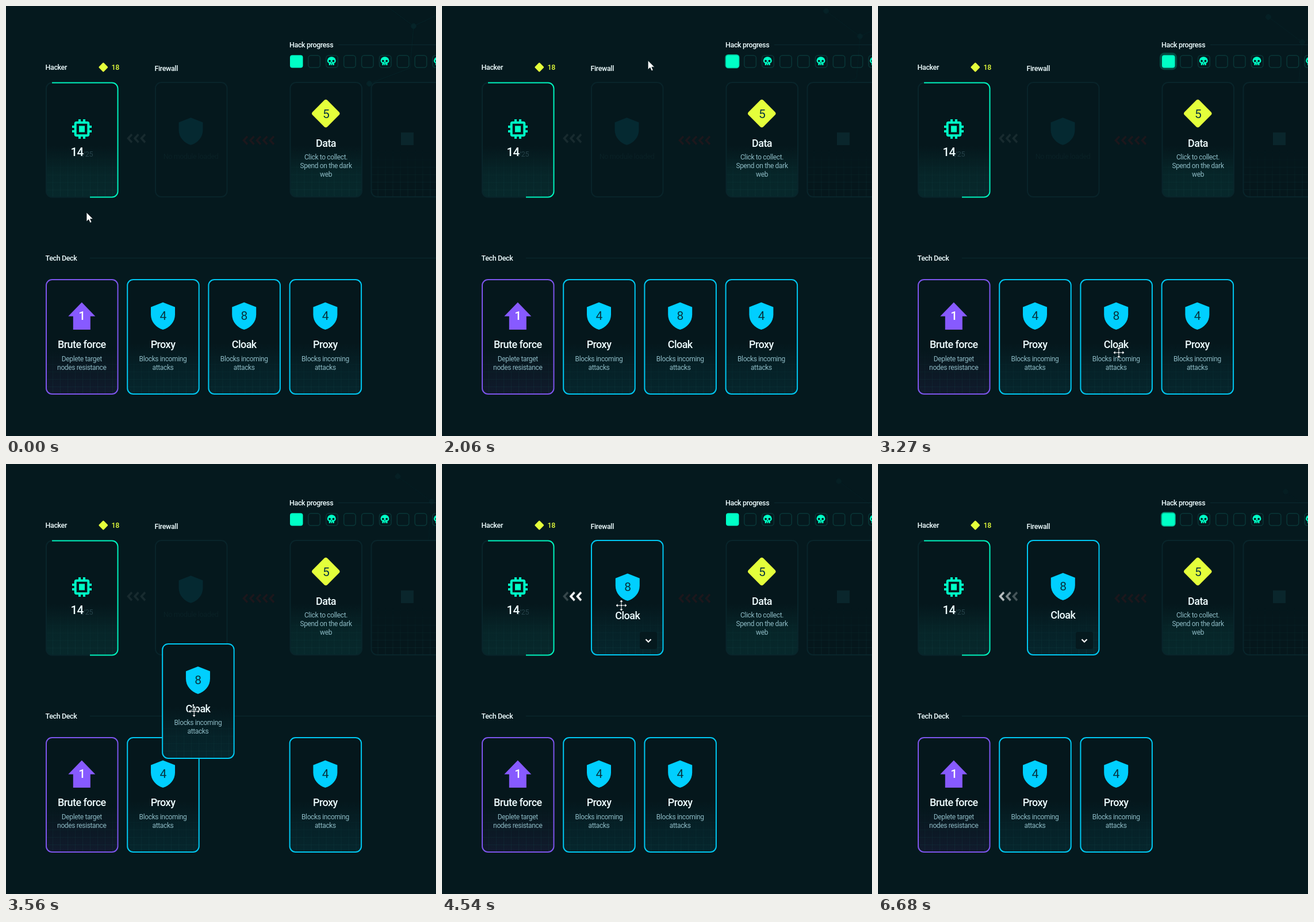
An HTML page for the animation above (6780 ms loop, 748 px wide and 748 px high).

```html
<!DOCTYPE html>
<html lang="en">
<head>
<meta charset="utf-8">
<title>Card table</title>
<style>
  html, body { margin: 0; width: 100%; height: 100%; overflow: hidden; background: #05191e; }
  svg { display: block; width: 100vw; height: 100vh; }
  text { font: 500 12.5px Roboto, sans-serif; letter-spacing: -.03em; fill: #effdff; }
  .mid { text-anchor: middle; }
  .title { font-size: 18px; }
  .desc { font-size: 12px; font-weight: 400; fill: #8dbac4; }
  .num { font-size: 21px; font-weight: 400; fill: #063440; }
  .line { stroke: #0b2a30; }
  .mint { fill: #00ffc6; }
  .lime { fill: #e4ff3b; }
  .chevrons path { fill: none; stroke: #fff; stroke-width: 3.6; }
  #threat path { stroke: #1c171c; }

  #ring { stroke: #00ffc6; animation: pulse 915ms linear -870ms infinite; }
  @keyframes pulse {
    0% { stroke-width: 0; stroke-opacity: .85; }
    70%, 100% { stroke-width: 11px; stroke-opacity: 0; }
  }
  #flow path { opacity: .08; animation: flow 915ms linear infinite; }
  #flow path:nth-child(3) { animation-delay: 4290ms; }
  #flow path:nth-child(2) { animation-delay: 4390ms; }
  #flow path:nth-child(1) { animation-delay: 4490ms; }
  @keyframes flow {
    0%, 4% { opacity: .08; }
    16%, 27% { opacity: 1; }
    70%, 100% { opacity: .08; }
  }
  #net { animation: drift 6780ms linear infinite; }
  @keyframes drift {
    from { transform: translate(0, 0); opacity: .85; }
    to { transform: translate(60px, 58px); opacity: .35; }
  }
</style>
</head>
<body>
<svg viewBox="0 0 748 748">
  <defs>
    <linearGradient id="teal" x2="0" y2="1">
      <stop offset=".55" stop-color="#0a4444" stop-opacity="0"/>
      <stop offset=".8" stop-color="#0a4444" stop-opacity=".32"/>
      <stop offset="1" stop-color="#0a4444" stop-opacity=".38"/>
    </linearGradient>
    <linearGradient id="blue" x2="0" y2="1">
      <stop offset=".55" stop-color="#07404a" stop-opacity="0"/>
      <stop offset=".8" stop-color="#07404a" stop-opacity=".26"/>
      <stop offset="1" stop-color="#07404a" stop-opacity=".36"/>
    </linearGradient>
    <linearGradient id="violet" x2="0" y2="1">
      <stop offset=".6" stop-color="#2b2250" stop-opacity="0"/>
      <stop offset="1" stop-color="#2b2250" stop-opacity=".32"/>
    </linearGradient>
    <linearGradient id="plain"><stop stop-opacity="0"/></linearGradient>
    <linearGradient id="fade" x2="0" y2="1">
      <stop offset=".58" stop-color="#fff" stop-opacity="0"/>
      <stop offset="1" stop-color="#fff"/>
    </linearGradient>
    <mask id="low"><rect width="127" height="201" fill="url(#fade)"/></mask>
    <pattern id="cells" width="13" height="13" patternUnits="userSpaceOnUse">
      <path d="M12.5 0V13M0 5.5H13" stroke="#14474b" stroke-opacity=".28" fill="none"/>
    </pattern>
    <path id="shield" d="M0-23.800 21-15.500V-2.500C21 10 12 20.500 0 23.800-12 20.500-21 10-21-2.500V-15.500Z" fill="#00cfff"/>
    <path id="up" d="M0-23.800 23.500.5H15V23.800H-15V.5H-23.500Z" fill="#875aff"/>
    <g id="skull">
      <path class="mint" d="M-7.5-1A7.5 6.8 0 0 1 7.5-1Q7.5 2 4.5 3.5V7H-4.5V3.5Q-7.5 2-7.5-1Z"/>
      <path d="M-1.5 4.8V7M1.5 4.8V7M0 1.5V3.4" stroke="#05191e" stroke-width="1.2"/>
      <circle cx="-3.2" cy="-.3" r="1.9" fill="#05191e"/><circle cx="3.2" cy="-.3" r="1.9" fill="#05191e"/>
    </g>
  </defs>

  <g id="net" fill="#08272c" stroke="#08262b">
    <path d="M650-9 709 35 703 108 632 135M709 35 780 2" fill="none"/>
    <circle cx="650" cy="-9" r="4.5"/><circle cx="709" cy="35" r="4.5"/><circle cx="632" cy="135" r="4.5"/>
  </g>

  <text x="493" y="71.5">Hack progress</text>
  <path class="line" d="M578 67.5H748M146 438.5H748"/>
  <g id="steps"></g>
  <text x="68.5" y="111">Hacker</text>
  <rect class="lime" x="-6" y="-6" width="12" height="12" rx="1.5" transform="translate(169.3 106.5)rotate(45)"/>
  <text class="lime" x="183.5" y="111">18</text>
  <text x="258.5" y="113">Firewall</text>
  <text x="68.5" y="442.5">Tech Deck</text>

  <g id="board"></g>

  <path d="M80 133.5H184.500A10 10 0 0 1 194.500 143.500V322.500A10 10 0 0 1 184.500 332.500H146" fill="none" stroke="#00f3bd" stroke-width="2"/>
  <g transform="translate(132 214)" stroke="#00ffc6" stroke-width="4">
    <rect x="-11.300" y="-11.300" width="22.600" height="22.600" rx="2" fill="none"/>
    <rect class="mint" x="-5" y="-5.500" width="10" height="11" stroke="none"/>
    <path d="M-4-17V-12M4-17V-12M-4 12V17M4 12V17M-17-4H-12M-17 4H-12M12-4H17M12 4H17"/>
  </g>
  <text x="112.500" y="260.500" style="font-size:20.500px">14</text>
  <text x="133" y="262" style="fill:#27434a;font-weight:400">/25</text>

  <use href="#shield" x="321.500" y="218" style="opacity:.09"/>
  <text class="mid" x="321.500" y="266" style="fill:#0a2126;font-weight:400">No module loaded</text>

  <rect class="lime" x="-18.200" y="-18.200" width="36.400" height="36.400" rx="4" transform="translate(556.300 187)rotate(45)"/>
  <text class="num mid" x="556.500" y="194.500">5</text>
  <text class="title mid" x="556.500" y="244.500">Data</text>
  <text class="desc mid" y="266.500"><tspan x="556.500">Click to collect.</tspan><tspan x="556.500" dy="15">Spend on the dark</tspan><tspan x="556.500" dy="15">web</tspan></text>

  <rect x="687" y="220" width="22" height="22" fill="#0a262c"/>

  <g id="flow" class="chevrons" transform="translate(210 222.500)"></g>
  <g id="threat" class="chevrons" transform="translate(411 226)"></g>

  <g id="deck"></g>

  <path id="arrow" d="M0 0V16L3.800 12.600 6.300 18.200 9 17 6.600 11.500H11.500Z" fill="#fff" stroke="#05191e" stroke-width=".8"/>
  <path id="move" d="M0-10 3.500-6H1V-1H6V-3.500L10 0 6 3.500V1H1V6H3.500L0 10-3.500 6H-1V1H-6V3.500L-10 0-6-3.500V-1H-1V-6H-3.500Z" fill="#fff" stroke="#05191e"/>
</svg>
<script>
const LOOP = 6780, GRAB = 3330, DROP = 4240, SETTLE = 4920;
const DECK_X = 69, DECK_Y = 475, PITCH = 141.2;
const $ = id => document.getElementById(id);
const place = (el, x, y) => el.setAttribute('transform', `translate(${x} ${y})`);
const show = (el, on) => el.style.display = on ? '' : 'none';

function base(tint, stroke) {
  const box = paint => `<rect x="1" y="1" width="124.500" height="199" rx="10" ${paint}/>`;
  return box('fill="#05171c"') + box(`fill="url(#${tint})"`)
    + box('fill="url(#cells)" mask="url(#low)"')
    + box(`fill="none" stroke="${stroke}" stroke-width="2"`);
}

const slot = (x, y, tint) =>
  `<g transform="translate(${x} ${y})">${base(tint, '#09252b')}</g>`;
$('board').innerHTML = slot(69, 132.5, 'teal')
  + '<rect x="260" y="133" width="124.500" height="199" rx="10" fill="#05181d" stroke="#09242a" stroke-width="2"/>'
  + slot(493.5, 132, 'teal') + slot(634.5, 132, 'plain');

// Progress track: every third step is a trap
let steps = '<rect id="ring" x="494" y="85.5" width="22" height="21.500" rx="4" fill="none"/>';
for (let i = 0; i < 9; i++) {
  const x = 494 + i * 30.9;
  steps += i
    ? `<rect x="${x + 1}" y="86" width="20.500" height="21" rx="4.500" fill="none" stroke="#0a3738" stroke-width="1.500"/>`
    : `<rect class="mint" x="${x}" y="85.5" width="22.500" height="22" rx="4"/>`;
  if (i % 3 == 2) steps += `<use href="#skull" x="${x + 10.5}" y="96"/>`;
}
$('steps').innerHTML = steps;

const chevrons = n => Array.from({ length: n }, (_, i) =>
  `<path d="M${9 + i * 11.5} 0.800 ${2.5 + i * 11.5} 7.800 ${9 + i * 11.5} 14.800"/>`).join('');
$('flow').innerHTML = chevrons(3);
$('threat').innerHTML = chevrons(5);

const cards = [
  ['Brute force', 1, 'up', 'Deplete target', 'nodes resistance'],
  ['Proxy', 4, 'shield', 'Blocks incoming', 'attacks'],
  ['Proxy', 4, 'shield', 'Blocks incoming', 'attacks'],
  ['Cloak', 8, 'shield', 'Blocks incoming', 'attacks']
].map(([name, num, icon, a, b]) => {
  const up = icon == 'up', g = document.createElementNS('http://www.w3.org/2000/svg', 'g');
  g.innerHTML = base(up ? 'violet' : 'blue', up ? '#7d55ec' : '#00c8f2') + `
    <g class="face"><use href="#${icon}" x="62.800" y="64.200"/>
    <text class="num mid" x="62.800" y="71"${up ? ' style="fill:#fff;font-weight:500"' : ''}>${num}</text>
    <text class="title mid" x="62.800" y="120">${name}</text></g>
    <text class="desc mid" y="142.500"><tspan x="62.800">${a}</tspan><tspan x="62.800" dy="15">${b}</tspan></text>`;
  $('deck').append(g);
  return g;
});
const [brute, proxy, spare, cloak] = cards;
cloak.insertAdjacentHTML('beforeend', `<g id="toggle">
  <rect x="85" y="160" width="30" height="30" rx="4" fill="#05191e"/>
  <path d="M95.500 173 100 177.500 104.500 173" fill="none" stroke="#fff" stroke-width="2.200"/></g>`);
const face = cloak.querySelector('.face'), note = cloak.querySelector('.desc');
const seat = (card, col) => place(card, DECK_X + col * PITCH, DECK_Y);
seat(brute, 0);
seat(proxy, 1);

// Pointer route: time, x, y
const route = [
  [0, 140, 359], [230, 195, 393], [480, 285, 350], [720, 265, 284], [960, 223, 205],
  [1190, 251, 126], [1400, 335, 110], [1570, 380, 240], [1730, 310, 383], [1900, 232, 250],
  [2060, 358, 95], [2190, 305, 150], [2410, 170, 330], [2600, 215, 450], [2790, 304, 472],
  [3000, 375, 560], [3200, 418, 603], [3270, 419, 603], [GRAB, 408, 594], [3410, 385, 570],
  [3500, 347, 501], [3600, 318, 385], [3710, 309, 280], [3820, 308, 257], [4200, 308, 257],
  [4540, 312, 246], [5260, 312, 246], [5460, 370, 290], [5930, 598, 561], [6200, 700, 690], [6380, 775, 780], [LOOP, 775, 780]
];
const same = (a, b) => a[1] == b[1] && a[2] == b[2];
function slope(i, k) {
  const a = route[Math.max(i - 1, 0)], p = route[i], b = route[Math.min(i + 1, route.length - 1)];
  return same(a, p) || same(p, b) ? 0 : (b[k] - a[k]) / (b[0] - a[0]);
}
function pointer(t) {
  const i = Math.max(0, route.findIndex(p => p[0] > t) - 1);
  const a = route[i], b = route[i + 1], d = b[0] - a[0], u = (t - a[0]) / d;
  return [1, 2].map(k => a[k] * (1 + 2 * u) * (1 - u) ** 2 + b[k] * u * u * (3 - 2 * u)
    + d * (slope(i, k) * u * (1 - u) ** 2 - slope(i + 1, k) * u * u * (1 - u)));
}

const motions = document.getAnimations();
motions.forEach(m => m.pause());

function draw(now) {
  const t = now % LOOP, [x, y] = pointer(t);
  motions.forEach(m => m.currentTime = t);

  const docked = t >= DROP;
  if (docked) place(cloak, 259, 132);
  else if (t >= GRAB) place(cloak, x - 56, y - 118.5);
  else seat(cloak, 2);
  const nudge = t < SETTLE ? 1 : 0;
  place(face, docked ? nudge : 0, docked ? 17 + nudge : 0);
  show(note, !docked);
  show($('toggle'), docked);

  const u = Math.min(1, Math.max(0, (t - DROP) / 240));
  seat(spare, 2 + (1 - u) ** 3);

  const grip = t > 2810 && t < 5500;
  show($('move'), grip);
  show($('arrow'), !grip);
  place($(grip ? 'move' : 'arrow'), x, y);
  requestAnimationFrame(draw);
}
draw(0);
</script>
</body>
</html>
```
